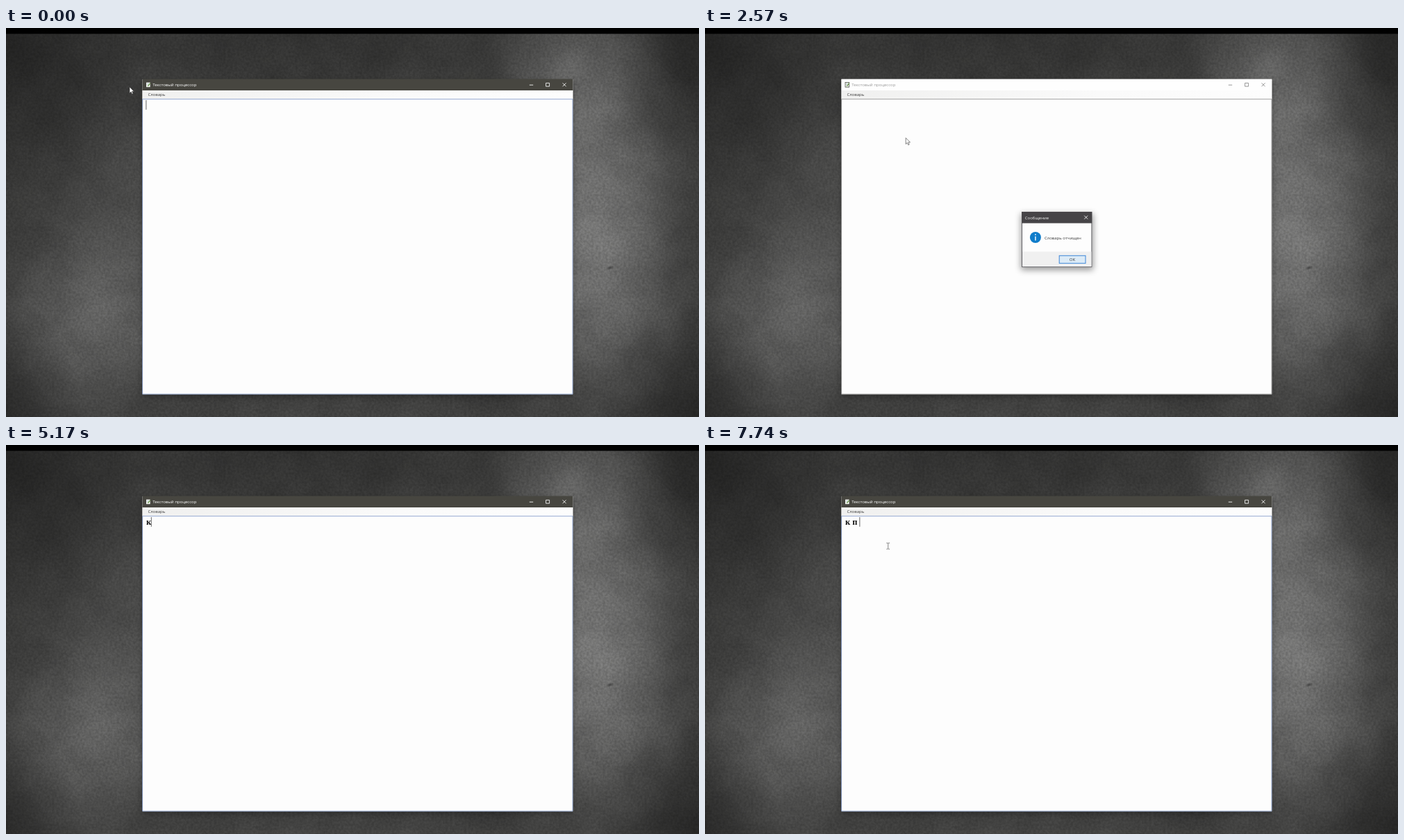
These frames come from a looping animation (998 by 561 pixels, 7770 ms). An HTML page:

```html
<!DOCTYPE html>
<html lang="ru">
<head>
<meta charset="utf-8">
<title>Текстовый процессор</title>
<style>
  html, body { margin: 0; width: 100%; height: 100%; overflow: hidden; background: #000; }
  svg { position: absolute; inset: 0; width: 100%; height: 100%; display: block; }
  text { font: 6px "Open Sans", "Noto Sans", sans-serif; fill: #3a3a3a; white-space: pre; }
  #typed { font: bold 12.4px "Liberation Serif", "Noto Serif", serif; fill: #111; }
  .grain { mix-blend-mode: overlay; }
</style>
</head>
<body>
<!-- Concrete wall -->
<svg viewBox="0 0 998 561" preserveAspectRatio="none">
  <defs>
    <radialGradient id="light">
      <stop offset="0" stop-color="#fff"/>
      <stop offset=".35" stop-color="#fff" stop-opacity=".72"/>
      <stop offset=".7" stop-color="#fff" stop-opacity=".22"/>
      <stop offset="1" stop-color="#fff" stop-opacity="0"/>
    </radialGradient>
    <radialGradient id="dark">
      <stop offset="0" stop-color="#000"/>
      <stop offset="1" stop-color="#000" stop-opacity="0"/>
    </radialGradient>
    <filter id="blotches" x="0" y="0" width="100%" height="100%" color-interpolation-filters="sRGB">
      <feTurbulence type="fractalNoise" baseFrequency=".018" numOctaves="4" seed="7"/>
      <feColorMatrix values="1.5 0 0 0 -.25  1.5 0 0 0 -.25  1.5 0 0 0 -.25  0 0 0 0 1"/>
    </filter>
    <filter id="specks" x="0" y="0" width="100%" height="100%" color-interpolation-filters="sRGB">
      <feTurbulence type="fractalNoise" baseFrequency=".3" numOctaves="2" seed="3"/>
      <feColorMatrix values="1.6 0 0 0 -.3  1.6 0 0 0 -.3  1.6 0 0 0 -.3  0 0 0 0 1"/>
    </filter>
  </defs>
  <rect width="998" height="561" fill="#393938"/>
  <g fill="url(#light)">
    <ellipse cx="125" cy="425" rx="180" ry="190" opacity=".19"/>
    <ellipse cx="190" cy="260" rx="170" ry="230" opacity=".09"/>
    <ellipse cx="835" cy="270" rx="180" ry="350" opacity=".3"/>
    <ellipse cx="820" cy="60" rx="150" ry="130" opacity=".11"/>
    <ellipse cx="900" cy="420" rx="140" ry="190" opacity=".06"/>
    <ellipse cx="480" cy="561" rx="420" ry="70" opacity=".05"/>
  </g>
  <g fill="url(#dark)">
    <ellipse cx="0" cy="20" rx="230" ry="230" opacity=".4"/>
    <ellipse cx="0" cy="561" rx="110" ry="170" opacity=".3"/>
    <ellipse cx="998" cy="20" rx="130" ry="170" opacity=".35"/>
    <ellipse cx="998" cy="561" rx="150" ry="160" opacity=".35"/>
    <ellipse cx="440" cy="10" rx="300" ry="80" opacity=".18"/>
    <ellipse cx="870" cy="346" rx="7" ry="3" opacity=".4" transform="rotate(-18 870 346)"/>
  </g>
  <rect class="grain" width="998" height="561" filter="url(#blotches)" opacity=".08"/>
  <rect class="grain" width="998" height="561" filter="url(#specks)" opacity=".1"/>
  <rect width="998" height="8.4"/>
</svg>

<svg viewBox="0 0 998 561" preserveAspectRatio="none">
  <defs>
    <linearGradient id="menubar">
      <stop offset="0" stop-color="#f0f0ef"/>
      <stop offset=".6" stop-color="#fafafa"/>
      <stop offset="1" stop-color="#fdfdfd"/>
    </linearGradient>
    <linearGradient id="strip">
      <stop offset="0" stop-color="#fcfcfc"/>
      <stop offset="1" stop-color="#efefee"/>
    </linearGradient>
    <filter id="blur" x="-20%" y="-20%" width="140%" height="140%"><feGaussianBlur stdDeviation="5"/></filter>
  </defs>

  <!-- Main window -->
  <rect x="197" y="78" width="619" height="453" opacity=".32" filter="url(#blur)"/>
  <rect x="196.5" y="74" width="619.8" height="454.3" fill="#fdfdfd"/>
  <rect id="titlebar" x="196.5" y="73.6" width="619.8" height="16.4"/>
  <rect x="196.5" y="90" width="619.8" height="12.5" fill="url(#menubar)"/>
  <path id="frame" d="M196.6 102.6H816V528H196.6Z" fill="none" stroke-width=".8"/>
  <g>
    <rect id="page" x="202" y="78.6" width="5.6" height="6.6" fill="#f4f6f2" stroke-width=".8"/>
    <path d="M203 80.4h3M203 82h2" stroke="#9fb3bd" stroke-width=".6"/>
    <path d="M204.3 83.8l3.4-4.2" stroke="#5d8f3c" stroke-width="1.1"/>
  </g>
  <text id="caption" x="211.3" y="84.2">Текстовый процессор</text>
  <path id="buttons" d="M753.8 82.2h5.4M777.6 79.4h5v4.8h-5zM801.6 79.3l5 5m0-5l-5 5" fill="none" stroke-width=".9"/>

  <text id="typed" x="202" y="115.2"></text>
  <rect id="caret" y="104" width=".9" height="13.8" fill="#555"/>

  <!-- Menu -->
  <g id="menu">
    <path d="M203 138.6H301.2V104" fill="none" stroke="#000" stroke-opacity=".45" stroke-width="1.8"/>
    <rect x="199.8" y="101.5" width="100" height="36" fill="#fcfcfc" stroke="#8d8d8d" stroke-width=".8"/>
    <rect x="200.4" y="102" width="11.4" height="35" fill="url(#strip)"/>
    <path d="M199.8 102V91.6H233.8V101.5" fill="#fbfbfb" stroke="#8d8d8d" stroke-width=".8"/>
    <rect id="highlight" x="200.7" width="98.3" height="11.2" fill="#b5d7f3" stroke="#6ea4dc" stroke-width=".8"/>
    <text x="218.3" y="109.8">Создание словаря</text>
    <text x="218.3" y="121.4">Обновление словаря</text>
    <text x="218.3" y="132.9">Очистить словарь</text>
  </g>
  <text x="204.4" y="98.4">Словарь</text>

  <!-- Message box -->
  <g id="dialog">
    <rect x="455" y="268" width="104" height="81" opacity=".4" filter="url(#blur)"/>
    <rect x="456.5" y="265.5" width="100.4" height="79" fill="#fdfdfd" stroke="#55545a" stroke-width=".9"/>
    <rect x="456.2" y="265.2" width="101" height="16.3" fill="#464447"/>
    <rect x="457" y="322.5" width="99.4" height="21.6" fill="#f0f0f0"/>
    <text x="460.8" y="275.5" style="fill:#f2f2f2">Сообщение</text>
    <path d="M546.2 270.6l5 5m0-5l-5 5" stroke="#f4f4f4" stroke-width=".9"/>
    <circle cx="475.9" cy="302" r="8" fill="#0f7cca"/>
    <path d="M475.9 300.4v6.2M475.9 297v1.7" stroke="#fff" stroke-width="1.4"/>
    <text x="489" y="304.6">Словарь отчищен</text>
    <rect x="510.2" y="328.3" width="37.8" height="11" fill="#dcebf7" stroke="#3c86d8" stroke-width="1"/>
    <text x="529" y="336.1" text-anchor="middle">OK</text>
  </g>

  <path id="arrow" d="M0 0V8.9L2.1 7L3.5 10.2L5 9.6L3.6 6.4H6.3Z" fill="#fff" stroke="#333" stroke-width=".6"/>
  <path id="beam" d="M-2.4 -4.4H-.6L0 -3.9L.6 -4.4H2.4M0 -3.9V3.9M-2.4 4.4H-.6L0 3.9L.6 4.4H2.4" fill="none" stroke="#666" stroke-width=".8"/>
</svg>

<script>
const LOOP = 7770, BLINK = 530;
const MENU_OPEN = 450, ITEM_CLICK = 2200, DIALOG_OPEN = 2280, DIALOG_CLOSE = 3740;
const ARROW_END = 3840, BEAM_START = 7350;

// [time, x, y] of the pointer tip
const arrowPath = [
  [0, 178, 85], [120, 178, 85], [380, 214, 95], [480, 214, 95],
  [760, 226, 118], [1050, 226, 118], [1550, 252, 132.5], [2400, 252, 132.5],
  [3150, 533, 329]
];
const beamPath = [[BEAM_START, 258, 154], [7600, 263.7, 145.7]];

// [time, text, caret x]
const typing = [
  [0, "", 201.4], [5150, "к", 208.8], [5640, "к ", 211.8],
  [6280, "к п", 219.4], [6640, "к п ", 222.4]
];
const itemTops = [102.2, 113.7, 125.3];

const $ = id => document.getElementById(id);
const show = (id, on) => $(id).setAttribute("visibility", on ? "visible" : "hidden");
const set = (id, attrs) => {
  for (const name in attrs) $(id).setAttribute(name, attrs[name]);
};
const ease = k => k * k * (3 - 2 * k);

function along(path, t) {
  const next = path.findIndex(p => p[0] > t);
  if (next < 0) return path[path.length - 1].slice(1);
  if (next === 0) return path[0].slice(1);
  const [t0, x0, y0] = path[next - 1], [t1, x1, y1] = path[next];
  const k = ease((t - t0) / (t1 - t0));
  return [x0 + (x1 - x0) * k, y0 + (y1 - y0) * k];
}

function drawWindow(active) {
  set("titlebar", { fill: active ? "#474640" : "#fefefe" });
  set("frame", { stroke: active ? "#7f97c8" : "#8e8e8e" });
  set("page", { stroke: active ? "none" : "#4a4f45" });
  set("buttons", { stroke: active ? "#f4f4f4" : "#8c8c8c" });
  $("caption").style.fill = active ? "#fff" : "#9a9a9a";
}

function drawMenu(t, pointerY) {
  const open = t >= MENU_OPEN && t < ITEM_CLICK;
  const item = itemTops.findLastIndex(top => pointerY >= top);
  show("menu", open);
  show("highlight", open && item >= 0);
  if (item >= 0) set("highlight", { y: itemTops[item] });
}

function drawText(t) {
  const [typedAt, text, x] = typing.findLast(step => step[0] <= t);
  const since = t - (t >= DIALOG_CLOSE ? Math.max(typedAt, DIALOG_CLOSE) : 0);
  const focused = t < MENU_OPEN || t >= DIALOG_CLOSE;
  $("typed").textContent = text;
  set("caret", { x });
  show("caret", focused && since % (2 * BLINK) < BLINK);
}

function render(t) {
  const dialog = t >= DIALOG_OPEN && t < DIALOG_CLOSE;
  const arrow = along(arrowPath, t);
  drawWindow(!dialog);
  drawMenu(t, arrow[1]);
  drawText(t);
  show("dialog", dialog);
  show("arrow", t < ARROW_END);
  set("arrow", { transform: `translate(${arrow})` });
  show("beam", t >= BEAM_START);
  set("beam", { transform: `translate(${along(beamPath, t)})` });
}

const start = performance.now();
function tick() {
  render((performance.now() - start) % LOOP);
  requestAnimationFrame(tick);
}
tick();
</script>
</body>
</html>
```
